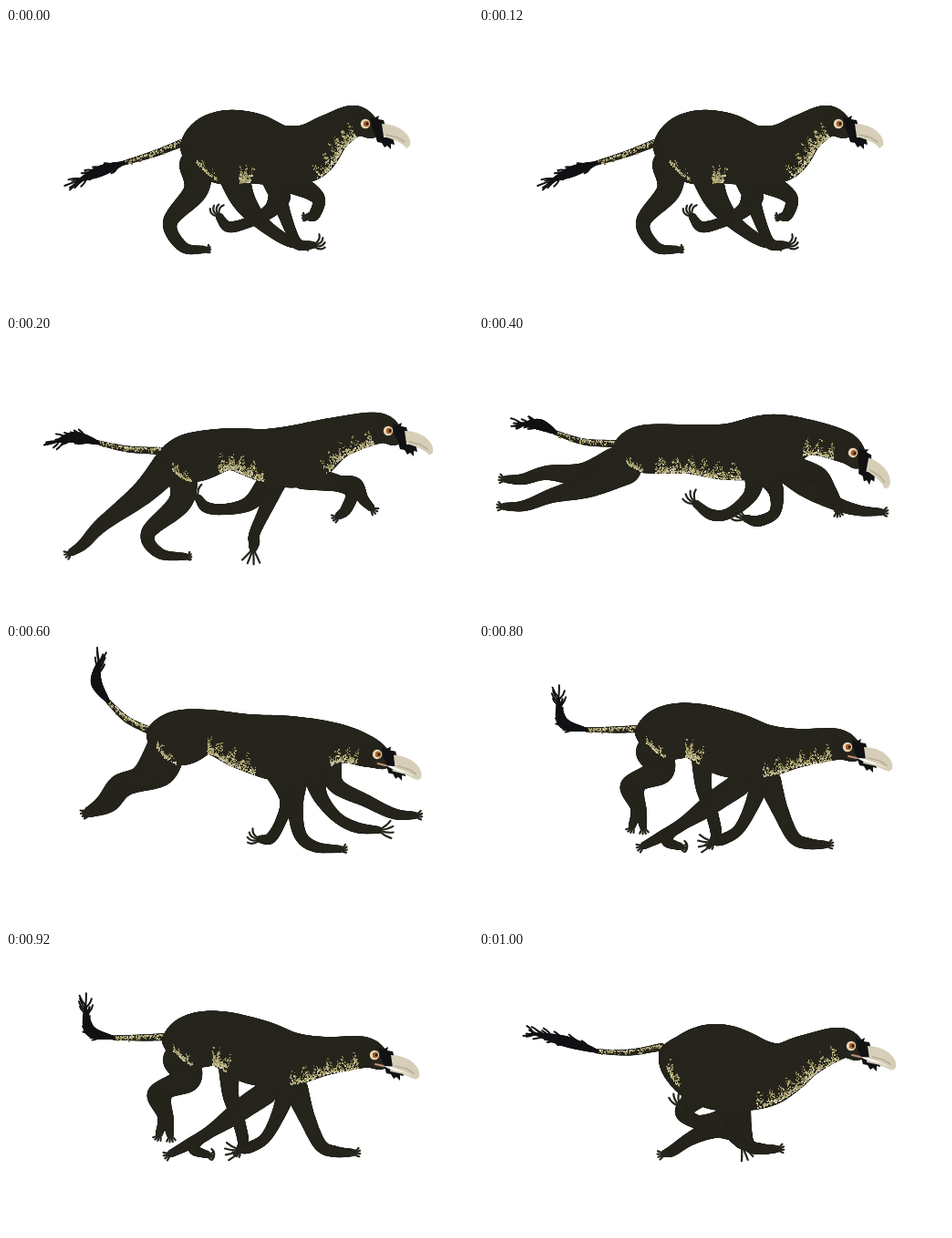
An HTML page with a canvas that plays this animation: 512 px wide and 307 px high, repeating every 1200 ms.

```html
<!DOCTYPE html>
<html lang="en">
<head>
<meta charset="utf-8">
<title>Running creature</title>
<style>
html, body { margin: 0; width: 100%; height: 100%; overflow: hidden; background: #fff; }
canvas { display: block; }
</style>
</head>
<body>
<canvas id="stage" width="512" height="307"></canvas>
<script>
const ctx = document.getElementById("stage").getContext("2d");
const HOLD = 200;
const FUR = "#26251d", BLACK = "#121215", BEAK = "#d6ceb8";

// Every limb has five joints; its kind sets the thickness at each and the claw length.
const LIMBS = {
  hind: { radii: [18, 13, 8, 6, 4], claw: 5 },
  paw: { radii: [13, 9, 7, 6, 4], claw: 5 },
  talon: { radii: [12, 8, 6, 6, 4], claw: 13 }
};
const TAIL = [4, 3.5, 2.5], TUFT = [2, 6, 1];

// spine: x,y,radius from rump to neck; tail: rump, bend, tuft root, middle, tip
// pale: belly start and end, chest start, as positions along the spine
// head: eye x, eye y, turn in degrees, mouth open
const poses = [
  {
    spine: "208,130,17 235,131,39 265,131,39 298,139,33 330,137,31 356,116,22",
    tail: "193,126 162,138 129,148 103,157 78,168",
    hind: ["208,150 208,178 180,213 194,240 217,243", "248,155 260,188 281,214 308,233 325,238"],
    paw: ["312,168 335,180 343,190 338,205 332,207"],
    talon: ["300,185 290,200 266,213 244,218 234,207", "292,165 302,195 312,222 320,237 336,238"],
    pale: [1.7, 2.4, 4],
    head: [394, 105, 0, false]
  },
  {
    spine: "183,131,14 205,133,27 245,124,23 285,131,29 322,131,34 362,112,23",
    tail: "172,126 134,124 101,117 76,111 54,116",
    hind: ["180,140 150,172 105,207 85,228 72,237", "192,140 192,180 156,216 168,238 196,242"],
    paw: ["325,155 360,161 383,162 391,178 400,188", "330,155 365,162 379,172 373,190 365,197"],
    talon: ["285,165 266,184 240,190 220,188 211,178", "298,155 288,182 273,215 272,226 271,233"],
    pale: [1.6, 3, 4.4],
    head: [419, 104, 0, false]
  },
  {
    spine: "158,128,13 180,124,26 230,124,27 275,127,31 318,120,34 358,111,20",
    tail: "150,118 115,116 84,106 66,97 46,97",
    hind: ["150,140 115,152 75,150 48,157 30,157", "160,145 120,164 80,175 50,186 28,187", "335,140 358,163 388,182 415,191 440,193"],
    paw: ["345,145 372,152 384,168 391,182 393,190"],
    talon: ["303,150 298,174 275,194 255,196 238,184", "318,155 326,172 324,194 306,203 293,200"],
    pale: [1.3, 3.2, 4.9],
    head: [410, 128, 18, false]
  },
  {
    spine: "167,99,13 190,103,30 222,96,24 265,108,31 312,115,36 362,109,22",
    tail: "160,96 133,83 112,63 99,42 102,18",
    hind: ["178,120 170,143 133,158 115,178 92,186", "172,115 150,145 122,152 105,172 90,183"],
    paw: ["355,130 362,155 395,172 425,186 448,188", "320,140 317,175 322,208 338,222 366,225"],
    talon: ["338,145 345,168 363,190 384,201 408,204", "296,140 308,170 301,195 290,213 279,214"],
    pale: [2, 3.3, 4.8],
    head: [407, 121, 2, true]
  },
  {
    spine: "182,97,11 206,97,29 235,95,30 275,110,36 312,117,29 350,114,21",
    tail: "176,93 148,94 118,94 92,86 87,58",
    hind: ["195,120 200,140 175,155 178,185 180,200", "190,118 196,138 163,155 172,180 168,199"],
    paw: ["245,115 246,155 255,185 260,208 256,217", "300,145 262,166 225,196 200,211 181,221", "318,150 330,182 345,212 362,219 380,220"],
    talon: ["285,155 250,182 215,203 206,216 220,222", "310,145 300,175 285,203 268,214 257,217"],
    pale: [1.7, 2.5, 4],
    head: [404, 113, 0, true]
  },
  {
    spine: "210,113,13 230,121,31 262,126,47 305,134,38 332,129,29 358,114,23",
    tail: "200,104 166,110 130,109 95,98 58,89",
    hind: [],
    paw: ["245,155 224,176 252,192 276,200 290,198", "262,190 245,198 228,207 212,218 204,221", "285,170 290,195 296,212 310,216 326,216"],
    talon: ["285,165 266,180 240,185 226,178 221,170", "275,165 280,185 276,198 285,208 288,212"],
    pale: [0, 0, 3],
    head: [408, 103, 0, true]
  }
];

let seed;
const random = () => (seed = seed * 16807 % 2147483647) / 2147483647;
const points = s => s.split(" ").map(p => p.split(",").map(Number));
const withRadii = (pts, radii) => radii.map((r, i) => [pts[i][0], pts[i][1], r]);

// Smooth curve through the points; t counts whole points
function along(p, t) {
  const i = Math.max(0, Math.min(Math.floor(t), p.length - 2)), u = t - i;
  const b = p[i], c = p[i + 1], a = p[i - 1] || b, d = p[i + 2] || c;
  return b.map((v, k) => v + u / 2 * (c[k] - a[k] +
    u * (2 * a[k] - 5 * v + 4 * c[k] - d[k] + u * (3 * (v - c[k]) + d[k] - a[k]))));
}

function dot(x, y, r, color) {
  ctx.fillStyle = color;
  ctx.beginPath();
  ctx.arc(x, y, r, 0, 7);
  ctx.fill();
}

function flesh(p, color) {
  for (let t = 0; t <= p.length - 1; t += 1 / 32) dot(...along(p, t), color);
}

function polygon(s, color) {
  ctx.fillStyle = color;
  ctx.fill(new Path2D("M" + s + "Z"));
}

function line(path, width, color) {
  ctx.lineWidth = width;
  ctx.strokeStyle = color;
  ctx.stroke(new Path2D(path));
}

// Bent spike from a point: leaves at one angle, ends at another
function spike(x, y, length, from, to, width, color) {
  const cx = x + length * 0.6 * Math.cos(from), cy = y + length * 0.6 * Math.sin(from);
  line(`M${x} ${y}Q${cx} ${cy} ${cx + length * 0.5 * Math.cos(to)} ${cy + length * 0.5 * Math.sin(to)}`, width, color);
}

const heading = ([ax, ay], [bx, by]) => Math.atan2(by - ay, bx - ax);

function limb(joints, { radii, claw }) {
  const p = points(joints), [x, y] = p[4];
  flesh(withRadii(p, radii), FUR);
  const angle = heading(p[3], p[4]);
  const bend = angle - heading(p[2], p[3]);
  const turn = Math.atan2(Math.sin(bend), Math.cos(bend));
  for (let i = -1.5; i < 2; i++) {
    const a = angle + i * 0.4;
    spike(x + 3 * Math.cos(a), y + 3 * Math.sin(a), claw, a, a + turn * 1.3, 2.2, FUR);
  }
}

// Pale mottling on the lower side of a curve, fading inwards
function mottle(p, from, to, depth, density) {
  for (let n = (to - from) * density; n > 0; n--) {
    const t = from + (to - from) * random(), d = random() ** 1.7;
    const [x, y, r] = along(p, t), a = heading(along(p, t - 0.02), along(p, t + 0.02)) + Math.PI / 2;
    const reach = r - 1 - d * depth * (0.65 + 0.35 * Math.sin(t * 19));
    ctx.fillStyle = `hsl(52 ${20 + 10 * random()}% ${82 - 35 * random() - 25 * d}%)`;
    ctx.fillRect(Math.round(x + reach * Math.cos(a) - 0.5), Math.round(y + reach * Math.sin(a) - 0.5), 1 + random() * 1.5 | 0, 1 + random() * 2 | 0);
  }
}

function tail(s) {
  const p = points(s), stem = withRadii(p, TAIL), tuft = withRadii(p.slice(2), TUFT);
  flesh(stem, FUR);
  mottle(stem, 0, 2, 6, 80);
  flesh(tuft, BLACK);
  for (let t = 0.3; t < 2; t += 0.07) {
    const [x, y] = along(tuft, t), a = heading(along(tuft, t - 0.1), along(tuft, t + 0.1));
    const side = random() * 2 - 1;
    spike(x, y, 9 + 5 * random(), a + side, a + side * 0.3, 2, BLACK);
  }
}

function head([x, y, turn, open]) {
  ctx.save();
  ctx.translate(x, y);
  ctx.rotate(turn * Math.PI / 180);
  polygon("5,-9 9,-6 15,-9 14,-5 20,-4 22,3 20,15 30,14 32,23 28,22 28,28 24,24 21,26 18,21 13,20 10,10 7,4", BLACK);
  if (open) {
    polygon("10,12 28,13 45,21 43,25 30,20 18,16", "#fff");
    line("M18 17L32 20L43 25", 2, BEAK);
    line("M1 10L10 12", 2, "#c58f78");
  }
  ctx.fillStyle = BEAK;
  ctx.fill(new Path2D("M18 0Q32 0 42 8Q51 16 49 24L45 27Q41 20 20 14Z"));
  line("M23 12L35 15L43 20", 1.5, "#b8ae95");
  dot(0, 0, 5.2, "#ead9b8");
  dot(1, 0, 3.2, "#a4602f");
  dot(2, 0, 1.4, "#211812");
  ctx.restore();
}

// Skull and face keep their place relative to the eye
function skull([x, y, turn]) {
  const c = Math.cos(turn * Math.PI / 180), s = Math.sin(turn * Math.PI / 180);
  return [[-12, -3, 17], [6, 5, 11]].map(([u, v, r]) => [x + u * c - v * s, y + u * s + v * c, r]);
}

function draw(pose, index) {
  seed = 977 + index * 131;
  ctx.fillStyle = "#fff";
  ctx.fillRect(0, 0, 512, 307);
  ctx.lineCap = ctx.lineJoin = "round";
  tail(pose.tail);
  for (const kind in LIMBS) pose[kind].forEach(joints => limb(joints, LIMBS[kind]));
  const body = [...points(pose.spine), ...skull(pose.head)];
  const [bellyFrom, bellyTo, chestFrom] = pose.pale;
  flesh(body, FUR);
  mottle(body, 0.1, 0.9, 10, 140);
  mottle(body, bellyFrom, bellyTo, 20, 320);
  mottle(body, chestFrom, 5.8, 18, 240);
  head(pose.head);
}

let shown = -1;
function tick() {
  const index = Math.floor(performance.now() / HOLD) % poses.length;
  if (index !== shown) draw(poses[shown = index], index);
  requestAnimationFrame(tick);
}
tick();
</script>
</body>
</html>
```
